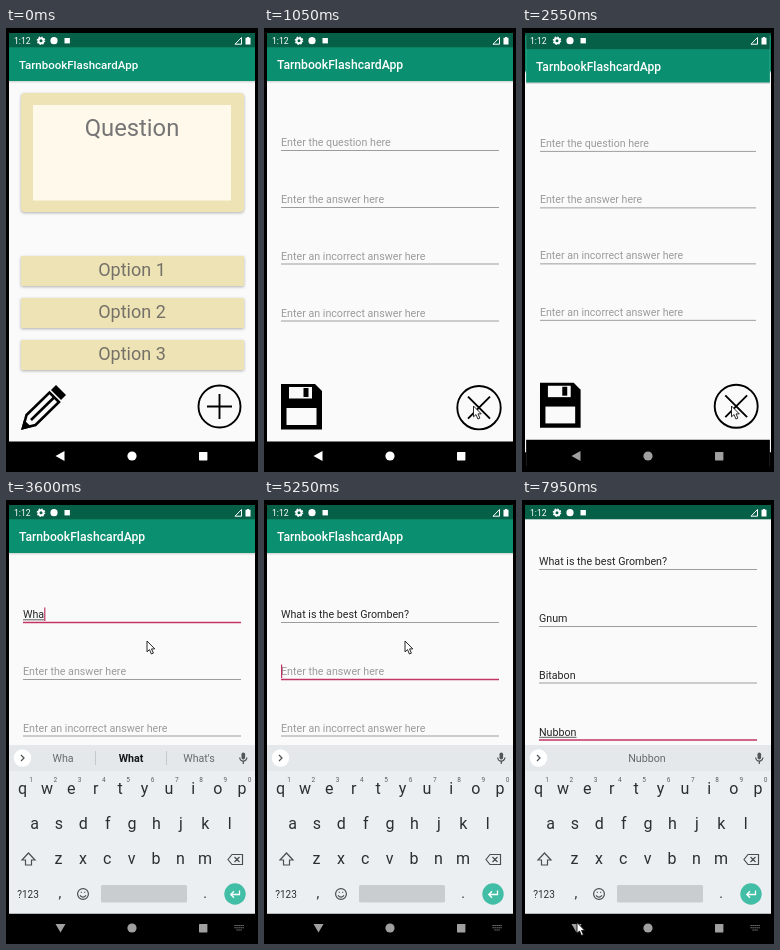
These frames come from a looping animation (252x444 px, 8 s). An HTML page:

```html
<!DOCTYPE html>
<html lang="en">
<head>
<meta charset="utf-8">
<title>Flashcard app</title>
<style>
  html, body { margin: 0; width: 100%; height: 100%; overflow: hidden; background: #000; }
  svg { display: block; width: 100%; height: 100%; font-family: Roboto, sans-serif; }
  .card { fill: #ede3b5; filter: drop-shadow(0 1.5px 1.5px rgba(0, 0, 0, .3)); }
  .mid { text-anchor: middle; }
  .bar { font-weight: 500; fill: #fff; }
  .line { fill: none; stroke: #000; stroke-width: 1.9; }
  .key { fill: #2b2f32; text-anchor: middle; }
  .icon { fill: none; stroke: #4a4f53; stroke-width: 1.2; }
</style>
</head>
<body>
<svg viewBox="0 0 252 444">
  <defs>
    <clipPath id="screen"><rect x="3" y="5" width="246" height="435"/></clipPath>
    <clipPath id="aboveNav"><rect x="3" y="5" width="246" height="408.5"/></clipPath>
  </defs>
  <rect width="252" height="444"/>
  <g clip-path="url(#screen)">
    <g id="main"></g>
    <g id="add"></g>
  </g>
  <g clip-path="url(#aboveNav)"><g id="keyboard"></g></g>
  <g id="status" fill="#fff">
    <text x="8" y="16" font-size="8.6">1:12</text>
    <circle cx="35" cy="12.7" r="2.5" fill="none" stroke="#fff" stroke-width="2"/>
    <circle cx="35" cy="12.7" r="3.7" fill="none" stroke="#fff" stroke-width="1.2" stroke-dasharray="1.45"/>
    <circle cx="48" cy="12.7" r="3.6"/>
    <rect x="58.5" y="10" width="5.4" height="5.4"/>
    <path d="M229 16.2L235.5 9.5V16.2Z" fill="none" stroke="#fff"/>
    <path d="M239.5 9.8H241V9H243V9.8H244.5V16.5H239.5Z"/>
  </g>
  <g id="nav">
    <path id="back"/>
    <circle cx="126" cy="428" r="4.6"/>
    <rect x="193" y="424" width="8.4" height="8.4" rx=".6"/>
    <path id="imeSwitch" d="M228.5 425.5H238M228.5 427.7H238M230.5 430H236" stroke="#909090" stroke-width="1.1" stroke-dasharray="1.2 .8"/>
  </g>
  <path id="cursor" d="M0 0V10.8L2.5 8.6L4.4 13L6.4 12.1L4.5 7.9H7.8Z" fill="#fff" stroke="#111" stroke-width=".9"/>
</svg>
<script>
const LOOP = 8000, STEP = 50;
const APP = 'TarnbookFlashcardApp';
const GREEN = '#0a9070', DARK_GREEN = '#066048', PAPER = '#fafafa', ACCENT = '#c23563';
const WRONG = 'Enter an incorrect answer here';

const fields = [
  { y: 122.5, hint: 'Enter the question here', text: 'What is the best Gromben?', focus: 3100, start: 3480, step: 58 },
  { y: 179.5, hint: 'Enter the answer here', text: 'Gnum', focus: 5100, start: 5350, step: 90 },
  { y: 236, hint: WRONG, text: 'Bitabon', focus: 5950, start: 6060, step: 58 },
  { y: 293, hint: WRONG, text: 'Nubbon', focus: 6550, start: 6900, step: 90 }
];
const pointer = [
  [100, 250, 410], [400, 209.5, 378], [2800, 209.5, 378], [3050, 143, 112],
  [3200, 141, 141], [7450, 141, 141], [7700, 110, 300], [7900, 55, 422.5]
];
const OPEN_1 = 535, CLOSE = 1527, OPEN_2 = 2400, SLIDE = 400, ZOOM = .06;

const $ = id => document.getElementById(id);
const set = (el, attrs) => { for (const k in attrs) el.setAttribute(k, attrs[k]); };
const clamp = v => Math.max(0, Math.min(1, v));
const ramp = (t, from, length) => clamp((t - from) / length);
const smooth = v => 1 - (1 - v) ** 3;
const rect = (x, y, w, h, rest) => `<rect x="${x}" y="${y}" width="${w}" height="${h}" ${rest}/>`;
const label = (x, y, size, text, rest = '') => `<text x="${x}" y="${y}" font-size="${size}" ${rest}>${text}</text>`;

// Fast rise followed by a very long settling.
const settle = p => p < 1 / 6 ? .4 * (p * 6) ** 2.2 : p >= 1 ? 1 : 1 - .6 * Math.exp(-11 * (p - 1 / 6));

function windowFrame(content, titleSize) {
  return rect(3, 5, 246, 435, `fill="${PAPER}"`) +
    `<g class="content">${rect(3, 19, 246, 34, `fill="${GREEN}"`)}` +
    rect(3, 53, 246, 1.5, 'fill="#000" opacity=".13"') +
    label(13, 41.2, titleSize, APP, 'class="bar"') + content + '</g>' +
    rect(3, 5, 246, 14.3, `fill="${DARK_GREEN}"`) + rect(3, 413.5, 246, 27, '');
}

function buildMain() {
  const options = [1, 2, 3].map((n, i) =>
    rect(15, 228 + 42 * i, 223, 30, 'class="card" rx="1"') +
    label(126, 247.5 + 42 * i, 18, 'Option ' + n, 'class="mid" fill="#757168"')).join('');
  const pencil = `
    <path d="M17 400L20.5 387L43.5 364.5L53 374L29.5 397Z" fill="${PAPER}" stroke="#000" stroke-width="2.6"/>
    <path d="M25 392L48 369.5" stroke="#000" stroke-width="2.6"/>
    <path d="M15 402L18 392L25.5 399Z"/>
    <path d="M45 362L50 357L60 367L55 372Z"/>`;
  $('main').innerHTML = windowFrame(
    rect(15, 65, 223, 119, 'class="card" rx="4"') + rect(27, 77, 198, 95.5, 'fill="#fef9ea"') +
    label(126, 108, 23.8, 'Question', 'class="mid" fill="#757575"') + options + pencil +
    '<circle class="line" cx="213.5" cy="378.5" r="21"/><path class="line" d="M201 378.5H226M213.5 366V391"/>', 11.5);
}

function buildAdd() {
  const rows = fields.map(f => `<g class="field">
    <text x="17" y="${f.y - 4.5}" font-size="10.7"></text>
    <path class="rule"/><path class="compose" stroke="#333" stroke-width=".8"/>
    <path class="caret" stroke="${ACCENT}" stroke-width="1.2"/></g>`).join('');
  const disk = `
    <path d="M17 356H51L58 363V401.5H17Z"/>
    ${rect(25, 359, 23, 11.5, `fill="${PAPER}"`)}${rect(39.5, 360, 5, 9, '')}
    ${rect(22.5, 380, 30, 17, `fill="${PAPER}"`)}`;
  $('add').innerHTML = windowFrame(rows + disk +
    '<circle class="line" cx="215" cy="379.7" r="21.7"/><path class="line" d="M204 368.7L226 390.7M226 368.7L204 390.7"/>', 12.2);
  document.querySelectorAll('.field').forEach((g, i) => {
    for (const name of ['text', '.rule', '.compose', '.caret']) fields[i][name.replace('.', '') + 'El'] = g.querySelector(name);
  });
}

function buildKeyboard() {
  const row = (letters, x, y) => [...letters].map((c, i) =>
    label(x + 24.4 * i, y, 16, c, 'class="key"')).join('');
  const digits = [...'1234567890'].map((c, i) => label(25 + 24.3 * i, 282, 6.5, c, 'class="key" opacity=".75"')).join('');
  $('keyboard').innerHTML =
    rect(3, 245, 246, 169, 'fill="#eceff2"') + rect(3, 245, 246, 26, 'fill="#e5e8eb"') +
    '<circle cx="16.5" cy="258" r="8.7" fill="#fff"/><path d="M15 255L18 258L15 261" class="icon" stroke-width="1.5"/>' +
    '<g id="hints">' + [57, 125, 193].map(x => label(x, 262, 10.7, '', 'class="mid" fill="#666b70"')).join('') +
    '<path id="dividers" d="M89.5 251V265M160.5 251V265" stroke="#c5c9cc"/></g>' +
    rect(235.5, 252.5, 3.6, 7, 'rx="1.8" fill="#50565a"') + '<path class="icon" d="M233.7 257.5A3.6 3.6 0 0 0 240.9 257.5M237.3 261V264"/>' +
    row('qwertyuiop', 16.5, 294) + digits + row('asdfghjkl', 28.5, 329) + row('zxcvbnm', 52.5, 364) +
    '<path class="icon" d="M22.5 353L29 360H25.5V365H19.5V360H16Z"/>' +
    '<path class="icon" d="M222 359.5L226 354.5H236.5V364.5H226ZM228.5 357L233.5 362M233.5 357L228.5 362"/>' +
    label(22, 397.5, 10, '?123', 'class="key"') + label(54, 397.5, 14, ',', 'class="key"') +
    '<circle class="icon" cx="77" cy="394" r="5.4"/><path class="icon" d="M74 395.3Q77 399 80 395.3M74.8 392.4h1M78.2 392.4h1"/>' +
    rect(95, 385, 86, 17.5, 'rx="1.5" fill="#cacdd0"') + label(199, 397.5, 14, '.', 'class="key"') +
    '<circle cx="229" cy="394" r="10.7" fill="#42bda6"/>' +
    '<path d="M233.5 390.5V394.5H225M228 391.3L224.8 394.5L228 397.7" fill="none" stroke="#fff" stroke-width="1.3"/>';
}

function place(id, scale, opacity) {
  set($(id), { transform: `translate(126 222) scale(${scale}) translate(-126 -222)`, opacity });
}

function drawWindows(t) {
  if (t >= CLOSE && t < OPEN_2) {
    const p = settle(ramp(t, CLOSE, SLIDE));
    place('main', 1 + ZOOM * (1 - p), 1);
    place('add', 1 - .1 * p, 1 - ramp(t, CLOSE + 55, 83));
  } else {
    const begin = t < CLOSE ? OPEN_1 : OPEN_2;
    const p = settle(ramp(t, begin, SLIDE));
    place('main', 1 + ZOOM * p, 1);
    place('add', .85 + .15 * p, ramp(t, begin + 35, 50));
  }
}

function suggest(field, typed) {
  const word = typed.split(' ').pop();
  if (!word || word.endsWith('?')) return ['', '', ''];
  const index = typed.split(' ').length - 1;
  const full = field.text.split(' ')[index].replace('?', '');
  return word === full ? ['', word, ''] : [word, full, full + "'s"];
}

function drawFields(t) {
  const active = fields.filter(f => t >= f.focus).pop();
  let hints = ['', '', ''];
  for (const f of fields) {
    const count = t < f.start ? 0 : Math.min(f.text.length, Math.floor((t - f.start) / f.step) + 1);
    const typed = f.text.slice(0, count), focused = f === active;
    f.textEl.textContent = typed || f.hint;
    set(f.textEl, { fill: typed ? '#252525' : '#9b9b9b' });
    set(f.ruleEl, { d: `M17 ${f.y}H235`, stroke: focused ? ACCENT : '#929292', 'stroke-width': focused ? 1.4 : .9 });

    const end = 17 + (typed ? f.textEl.getComputedTextLength() : 0);
    const word = typed.split(' ').pop();
    const composing = focused && word && !word.endsWith('?');
    const before = typed.length - word.length;
    const from = 17 + (composing && before ? f.textEl.getSubStringLength(0, before) : 0);
    set(f.composeEl, { d: composing ? `M${from} ${f.y - 2.7}H${end}` : '' });

    const lastKey = count ? f.start + (count - 1) * f.step : f.focus;
    const lit = focused && (t - lastKey) % 1000 < 500;
    set(f.caretEl, { d: lit ? `M${end + .6} ${f.y - 15}V${f.y - 1.5}` : '' });
    if (focused) hints = suggest(f, typed);
  }
  document.querySelectorAll('#hints text').forEach((el, i) => {
    const bold = i === 1 && active === fields[0];
    el.textContent = hints[i];
    set(el, { 'font-weight': bold ? 700 : 400, fill: bold ? '#15181a' : '#666b70' });
  });
  set($('dividers'), { opacity: hints[0] ? 1 : 0 });
  const pan = -53 * smooth(ramp(t, 6550, 200));
  set(document.querySelector('#add .content'), { transform: `translate(0 ${pan})` });
}

function drawSystem(t) {
  const up = smooth(ramp(t, 3150, 220)), typing = t >= 3200;
  set($('keyboard'), { transform: `translate(0 ${170 * (1 - up)})` });
  set($('nav'), { fill: t >= CLOSE ? '#a0a0a0' : '#fff' });
  set($('back'), { d: typing ? 'M49.5 424H59.5L54.5 432.5Z' : 'M58.5 423V433L49.5 428Z' });
  set($('imeSwitch'), { opacity: typing ? 1 : 0 });
}

function drawCursor(t) {
  const next = pointer.findIndex(p => p[0] > t);
  let [, x, y] = pointer[pointer.length - 1];
  if (next > 0) {
    const [t0, x0, y0] = pointer[next - 1], [t1, x1, y1] = pointer[next];
    const p = (t - t0) / (t1 - t0), k = p * p * (3 - 2 * p);
    x = x0 + (x1 - x0) * k;
    y = y0 + (y1 - y0) * k;
  }
  set($('cursor'), { transform: `translate(${x} ${y})`, opacity: next === 0 ? 0 : 1 });
}

function draw(now) {
  const t = Math.floor(now % LOOP / STEP) * STEP;
  drawWindows(t);
  drawFields(t);
  drawSystem(t);
  drawCursor(t);
}

buildMain();
buildAdd();
buildKeyboard();
const began = performance.now();
function tick() {
  draw(performance.now() - began);
  requestAnimationFrame(tick);
}
tick();
</script>
</body>
</html>
```
